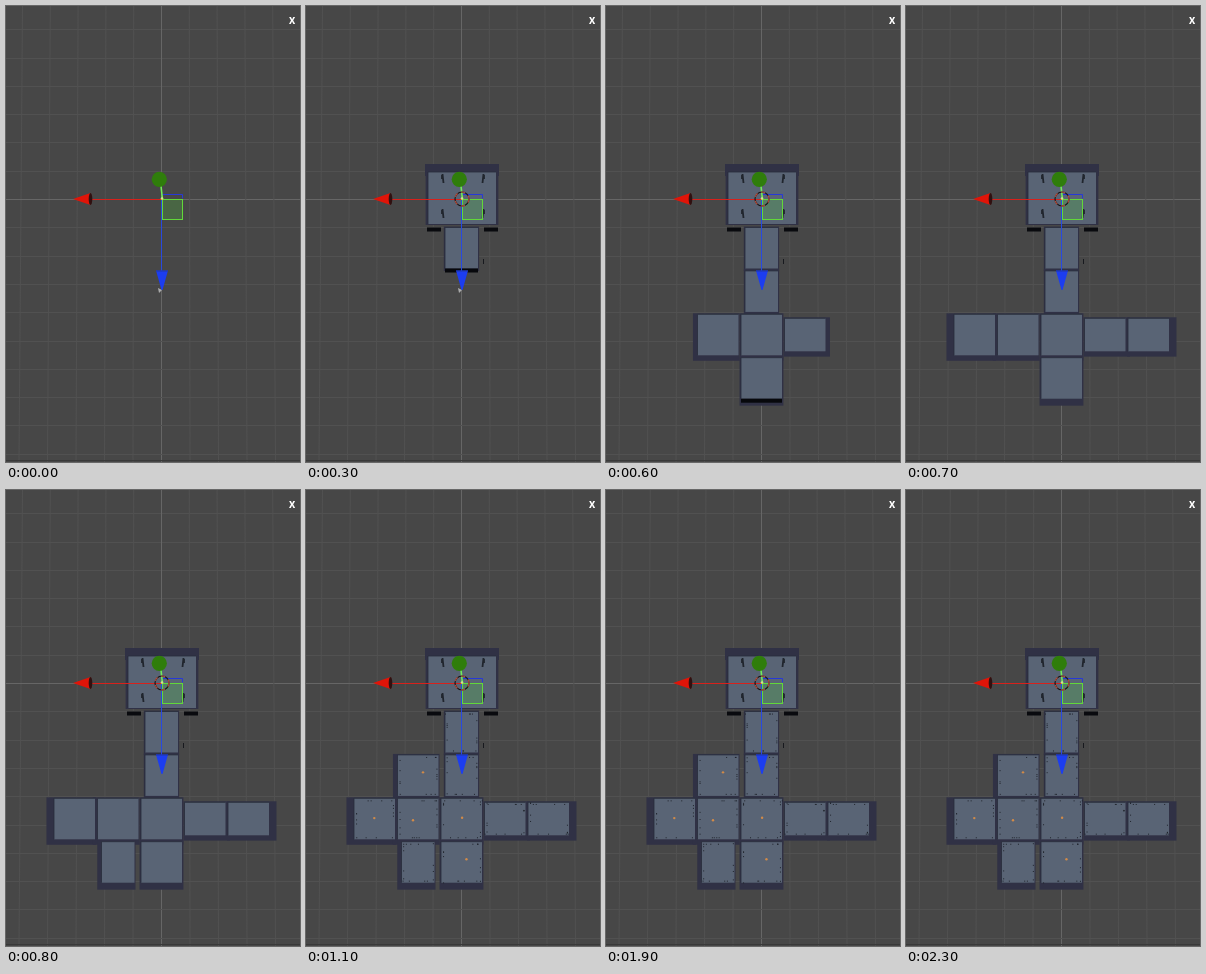
An HTML page that plays this animation: 294x456 px, repeating every 2400 ms.

```html
<!DOCTYPE html>
<html lang="en">
<head>
<meta charset="utf-8">
<style>
html, body { margin: 0; width: 100%; height: 100%; overflow: hidden; background: #474747; }
svg { display: block; width: 100vw; height: 100vh; }
</style>
</head>
<body>
<svg id="stage" viewBox="0 0 294 456" preserveAspectRatio="none">
  <rect width="294" height="456" fill="#474747"/>
  <g id="grid"></g>
  <path d="M0 454.5H294" stroke="#393939"/>
  <g id="walls"></g>
  <g id="floors"></g>
  <g id="details"></g>
  <path id="handle" d="M152 282l4 2-3 3z" fill="#aaa"/>
  <g id="gizmo">
    <path d="M156 188.5h20.5v4" fill="none" stroke="#2638d8"/>
    <rect x="156.5" y="193.5" width="20" height="20" fill="#52c83c" fill-opacity=".24" stroke="#62d83a"/>
    <path d="M155.5 193V266" stroke="#2849e0"/>
    <path d="M150 264.5h12l-5.5 19.5h-1z" fill="#1c3df0"/>
    <path d="M150 265h12" stroke="#2038a8"/>
    <path d="M156 193.5H84" stroke="#d8211b"/>
    <path d="M67 193l17.5-6v12z" fill="#e01408"/>
    <ellipse cx="84.5" cy="193" rx="1.8" ry="6" fill="#301010"/>
    <path d="M155 180l1.4 13" stroke="#70ee58" stroke-width="1.6"/>
    <circle cx="153.3" cy="173.3" r="7.6" fill="#2f7d0b"/>
    <circle cx="156" cy="192.5" r="1.3" fill="#d5e58a"/>
  </g>
  <g id="origin" fill="none" stroke-width="1.2">
    <circle cx="156" cy="193" r="7" stroke="#171313"/>
    <circle cx="156" cy="193" r="7" stroke="#b34d3c" stroke-dasharray="4 4"/>
  </g>
  <text x="286" y="18" text-anchor="middle" fill="#fff" font-family="Inter, Arial, sans-serif" font-size="11.5" font-weight="700">x</text>
</svg>
<script>
const LOOP = 2400, STEP = 100;
const VIEW = { x: 156, y: 193 };
const $ = id => document.getElementById(id);
const timed = [];

function show(el, from, to = LOOP) {
  timed.push({ el, from, to });
  return el;
}

function add(layer, tag, attrs, from = 0, to = LOOP) {
  const el = document.createElementNS("http://www.w3.org/2000/svg", tag);
  for (const key in attrs) el.setAttribute(key, attrs[key]);
  $(layer).append(el);
  return show(el, from, to);
}

const rect = (layer, x, y, width, height, fill, from, to) =>
  add(layer, "rect", { x, y, width, height, fill }, from, to);

let seed = 7;
function random() {
  seed = seed * 16807 % 2147483647;
  return seed / 2147483647;
}

// The view tilts slightly, so vertical grid lines spread downwards.
for (let i = -6; i <= 9; i++) {
  const y = Math.round(VIEW.y + i * 28.3) + .5;
  const stroke = i ? "#515151" : "#666";
  add("grid", "path", { d: `M${155.5 + i * 27.8} 0L${155.5 + i * 28.5} 456`, stroke });
  add("grid", "path", { d: `M0 ${y}H294`, stroke });
}

// Wall tops lie nearer the camera, so they project away from the view centre.
function room(cx, cy, w, h, from) {
  const x = cx - w / 2, y = cy - h / 2;
  const outX = v => VIEW.x + (v - VIEW.x) * 1.07;
  const outY = v => VIEW.y + (v - VIEW.y) * 1.035;
  const left = Math.min(x - 1, outX(x)), right = Math.max(x + w + 1, outX(x + w));
  const top = Math.min(y - 1, outY(y)), bottom = Math.max(y + h + 1, outY(y + h));
  rect("walls", left, top, right - left, bottom - top, "#303145", from);
  rect("floors", x, y, w, h, "#596475", from);
  add("floors", "path", { d: `M${x} ${y + h}V${y}H${x + w}`, fill: "none", stroke: "#282c3a", "stroke-width": .8 }, from);
}

function specks(cx, cy, w, h) {
  for (let i = 0; i < 16; i++) {
    const along = random() - .5, edge = i % 2 ? .45 : -.45;
    const [u, v] = i % 4 < 2 ? [along, edge] : [edge, along];
    rect("details", cx + u * w, cy + v * h, 1, 1, "#20242c", 900);
  }
}

// Each cell: the step when it appears, then v or h for a narrow passage.
const plan = [
  "    3v    ",
  "  9 4v    ",
  "7 5 5 6h7h",
  "  8v6     "
];

let markers = 0;
plan.forEach((line, row) => {
  for (let col = 0; col < 5; col++) {
    const [step, kind] = line.slice(col * 2);
    if (step === " ") continue;
    const from = step * STEP;
    const box = [
      155.5 + (col - 2) * 43.5, 242 + row * 43.4,
      kind === "v" ? 33 : 41, kind === "h" ? 33 : 41
    ];
    const [cx, cy, w, h] = box;
    room(...box, from);
    specks(...box);
    if (col === 2) rect("details", cx - w / 2, cy + h / 2, w, 4, "#07080c", from, from + STEP);
    if (kind === " ") {
      const drift = 5 * Math.cos(1.61 * markers++);
      add("details", "circle", { cx: cx + drift, cy: cy - .8 - drift * .45, r: 1.2, fill: "#d18a48" }, 1000);
    }
  }
});

// Entrance hall with a tall back wall, four props and two dark feet.
rect("walls", 119, 158, 74, 12, "#303145", 300);
room(156, 192, 68, 52, 300);
for (const side of [-1, 1]) {
  rect("details", 149.5 + side * 28.5, 221.5, 14, 4, "#090a0e", 300);
  for (const y of [168, 203])
    add("details", "path", {
      d: `M${157 + side * 20.5} ${y}l${-side} 9m${side * 1.5} -8v4`,
      stroke: "#20252d", "stroke-width": 1.8
    }, 300);
}
rect("details", 177, 253, 1, 5, "#17191e", 300);

show($("handle"), 0, 400);
show($("origin"), 300);

function draw(time) {
  for (const { el, from, to } of timed)
    el.style.display = time >= from && time < to ? "" : "none";
}

const start = performance.now();
function tick() {
  draw((performance.now() - start) % LOOP);
  requestAnimationFrame(tick);
}
tick();
</script>
</body>
</html>
```
